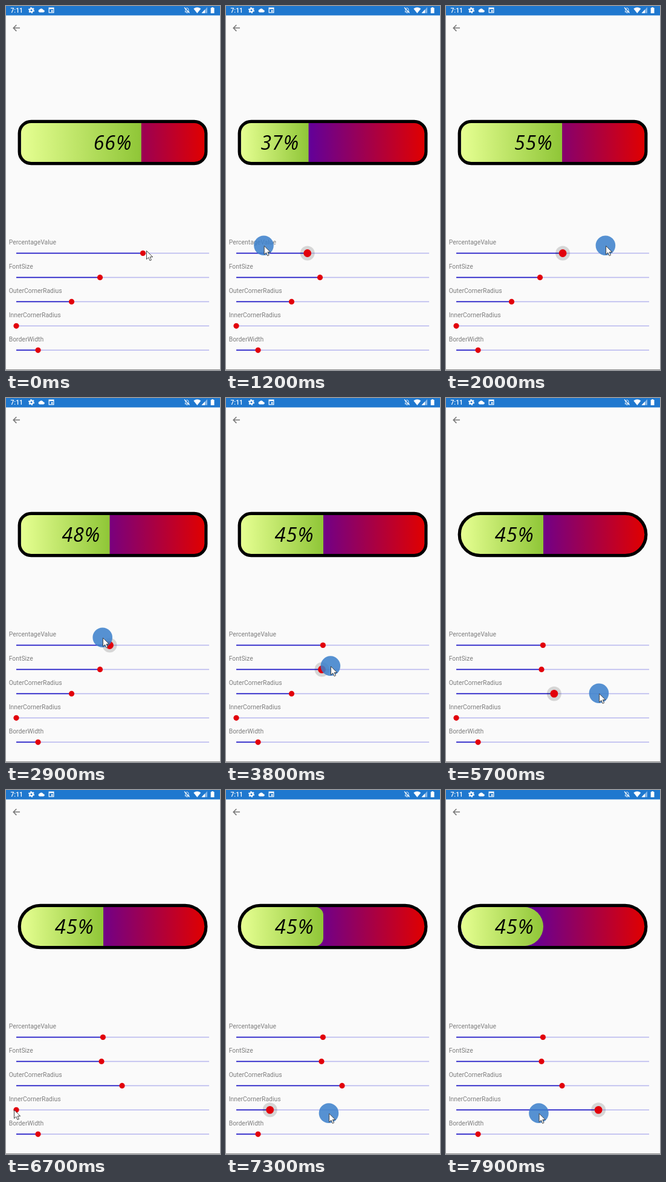
Animation, 354 px wide and 600 px high, one loop 8 s. Source, as an HTML page:

```html
<!DOCTYPE html>
<html lang="en">
<head>
<meta charset="utf-8">
<title>Progress bar sliders</title>
<style>
  html, body { margin: 0; width: 354px; height: 600px; overflow: hidden; background: #fafafa; }
  svg { display: block; }
  .clock { font: 500 10.5px Roboto, sans-serif; fill: #fff; }
  .label { font: 10.4px Roboto, sans-serif; fill: #7e7e7e; }
  #percent { font-family: "Open Sans", sans-serif; font-weight: 500; font-style: italic; letter-spacing: 1px; text-anchor: end; }
</style>
</head>
<body>
<svg width="354" height="600" viewBox="0 0 354 600">
  <defs>
    <linearGradient id="back"><stop stop-color="#1800f4"/><stop offset="1" stop-color="#e00000"/></linearGradient>
    <linearGradient id="lime"><stop stop-color="#e6ff92"/><stop offset="1" stop-color="#8fc637"/></linearGradient>
    <clipPath id="inside"><rect id="clip" x="22.2" y="190.3" width="308.6" height="69.4"/></clipPath>
  </defs>

  <rect width="354" height="15.5" fill="#1f78cf"/>
  <rect y="599" width="354" height="1" fill="#8a8a8a"/>

  <text class="clock" x="7.4" y="11">7:11</text>
  <g fill="#fff">
    <circle cx="42" cy="7" r="2.7" fill="none" stroke="#fff" stroke-width="2.2"/>
    <circle cx="42" cy="7" r="4.4" fill="none" stroke="#fff" stroke-width="1.4" stroke-dasharray="2.3 2.308"/>
    <path d="M55.5 10.5a2.4 2.4 0 0 1 0-4.7a3.4 3.4 0 0 1 6.1 .7a2 2 0 0 1 .4 4z"/>
    <path d="M70.5 2.5h9v9h-9zM71.7 5.3v5h6.6v-5zM74.8 7h2.6v2.6h-2.6z" fill-rule="evenodd"/>
    <path d="M296 9.8c1-.8 1-1.8 1-3.3c0-4.2 5-4.2 5 0c0 1.5 0 2.5 1 3.3z" fill="none" stroke="#fff"/>
    <path d="M295 2.5l8.5 9M298.5 11.3h2" stroke="#fff" stroke-width="1.1"/>
    <path d="M310.3 4.5q6-4.4 12 0l-6 7.5z"/>
    <path d="M333 2v9.8h-9.5z" opacity=".45"/>
    <path d="M329 6.1v5.7h-5.5z"/>
    <path d="M338.7 3h1.5v-1h2.8v1h1.5v9h-5.8z"/>
  </g>
  <path d="M23 36.3H12.5M17.3 31.2L12.2 36.3L17.3 41.4" fill="none" stroke="#757575" stroke-width="1.5"/>

  <g clip-path="url(#inside)">
    <rect x="24.5" y="192" width="304" height="66" fill="url(#back)"/>
    <rect id="fill" x="24.8" y="192.8" height="64.4" fill="url(#lime)"/>
  </g>
  <rect id="border" x="22.2" y="190.3" width="308.6" height="69.4" fill="none" stroke="#000" stroke-width="5.2"/>
  <text id="percent"></text>

  <g id="sliders"></g>
  <g id="cursor">
    <circle id="touch" cx="-.7" cy="-.7" r="16.3" fill="#3c80cc" fill-opacity=".86"/>
    <path d="M0 0V14L3.3 11L5.5 16.2L7.9 15.2L5.7 10.2H10.2Z" fill="#fff" stroke="#333" stroke-width=".9"/>
  </g>
</svg>
<script>
const LOOP = 8000, LAG = 250, HOLD = 400, LEFT = 17, RIGHT = 336;
const byId = id => document.getElementById(id);
const clamp = (v, lo, hi) => Math.max(lo, Math.min(hi, v));
const mix = (a, b, k) => a + (b - a) * k;
const ease = k => { k = clamp(k, 0, 1); return k * k * (3 - 2 * k); };
const set = (el, attrs) => { for (const k in attrs) el.setAttribute(k, attrs[k]); };
const add = (tag, attrs) => {
  const el = document.createElementNS('http://www.w3.org/2000/svg', tag);
  set(el, attrs);
  return byId('sliders').appendChild(el);
};

// A drag runs through its stops at constant speed (px/ms), then holds briefly.
const sliders = [
  { name: 'PercentageValue', start: 630, speed: .286, stops: [226.5, 49.5, 311, 160.4] },
  { name: 'FontSize', start: 3500, speed: .06, stops: [155.5, 184, 155, 158] },
  { name: 'OuterCornerRadius', start: 5250, speed: .35, stops: [108.5, 260, 192] },
  { name: 'InnerCornerRadius', start: 6900, speed: .392, stops: [13.5, 280, 100] },
  { name: 'BorderWidth', start: Infinity, speed: 1, stops: [53] }
];

sliders.forEach((s, i) => {
  const y = s.y = 407.5 + 39.95 * i;
  s.drift = 6 * i - 12;
  const length = s.stops.reduce((sum, x, j) => j ? sum + Math.abs(x - s.stops[j - 1]) : 0, 0);
  s.end = s.start + length / s.speed + HOLD;
  add('text', { class: 'label', x: 4.7, y: y - 14.3 }).textContent = s.name;
  add('rect', { x: LEFT, y: y - .8, width: RIGHT - LEFT, height: 1.6, fill: '#b9b8ee' });
  s.line = add('rect', { x: LEFT, y: y - .8, height: 1.6, fill: '#1c14c4' });
  s.ripple = add('circle', { cy: y, r: 12, fill: '#000', 'fill-opacity': .14 });
  s.thumb = add('circle', { cy: y, fill: '#e2000b' });
});

function dragX({ start, speed, stops }, t) {
  let left = Math.max(0, t - start) * speed;
  for (let i = 1; i < stops.length; i++) {
    const step = stops[i] - stops[i - 1];
    if (left < Math.abs(step)) return stops[i - 1] + Math.sign(step) * left;
    left -= Math.abs(step);
  }
  return stops[stops.length - 1];
}

// Drifts off the row while dragging, glides to the next thumb in between.
function pointer(t) {
  let from = { t: 0, x: 232.5, y: 403.5 };
  for (const s of sliders) {
    if (t < s.start) {
      const k = ease((t - from.t) / (s.start - from.t) / .65);
      return [mix(from.x, s.stops[0], from.t ? k : k * k), mix(from.y, s.y, k)];
    }
    if (t < s.end) return [dragX(s, t), s.y + s.drift * ease((t - s.start) / HOLD)];
    from = { t: s.end, x: dragX(s, s.end), y: s.y + s.drift };
  }
}

function draw(t) {
  const [px, py] = pointer(t);
  const touching = sliders.some(s => t >= s.start && t < s.end);
  set(byId('cursor'), { transform: `translate(${px} ${py})` });
  set(byId('touch'), { visibility: touching ? 'visible' : 'hidden' });

  // Thumbs trail the pointer.
  const late = t - LAG;
  const [value, font, outer, inner] = sliders.map(s => {
    const x = clamp(dragX(s, late), LEFT, RIGHT);
    const pressed = late >= s.start && late < s.end - LAG;
    set(s.line, { width: x - LEFT });
    set(s.ripple, { cx: x, visibility: pressed ? 'visible' : 'hidden' });
    set(s.thumb, { cx: x, r: pressed ? 6.4 : 4.6 });
    return x;
  });

  const share = (value - LEFT) / (RIGHT - LEFT);
  const width = share * 303;
  const size = 32 + (font - 155.5) * .25;
  const rx = Math.min(37, (outer - LEFT) * .24) - 2.5;
  set(byId('border'), { rx });
  set(byId('clip'), { rx });
  set(byId('fill'), { width, rx: Math.min(32.2, (inner - LEFT) * .24) });
  set(byId('percent'), { x: 9.3 + width, y: 225.2 + size * .36, 'font-size': size });
  byId('percent').textContent = Math.round(share * 100) + '%';
}

const begin = performance.now();
function tick() {
  draw((performance.now() - begin) % LOOP);
  requestAnimationFrame(tick);
}
tick();
</script>
</body>
</html>
```
